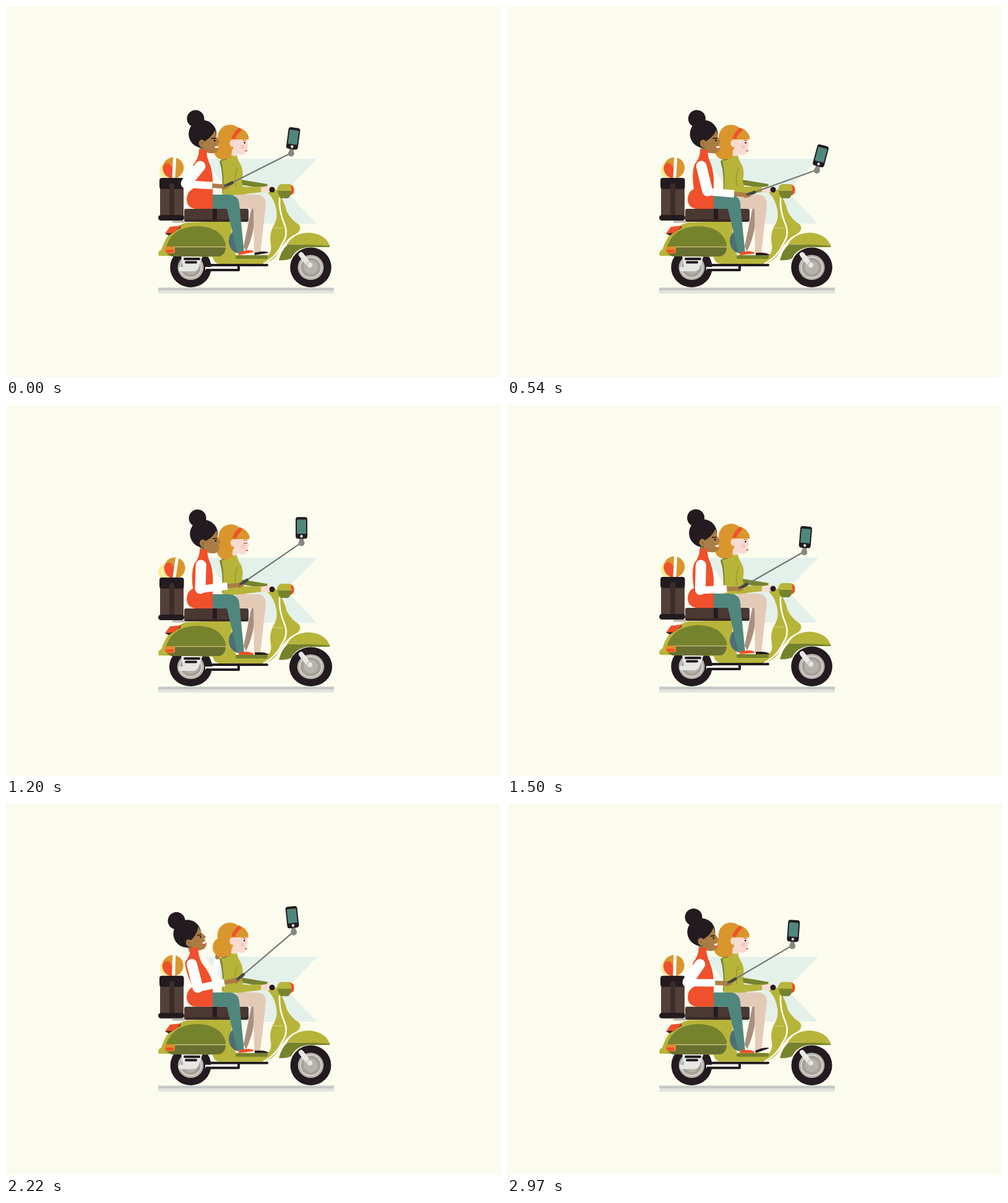
Write an HTML page with a canvas that moves like this. It is 800 by 600 pixels and loops after 3 s.

```html
<!DOCTYPE html>
<html lang="en">
<head>
<meta charset="utf-8">
<title>Scooter selfie</title>
<style>
html, body { margin: 0; width: 100%; height: 100%; overflow: hidden; background: #fcfcee; }
canvas { display: block; }
</style>
</head>
<body>
<canvas id="stage" width="800" height="600"></canvas>
<script>
const ctx = document.getElementById('stage').getContext('2d');
const LOOP = 3000, BOB = 750, STICK = 121;
const C = {
  bg: '#fcfcee', sky: '#e4f0ea', olive: '#b7b43a', green: '#76832d', moss: '#687031',
  dark: '#231b1f', brown: '#54403a', red: '#f0502b', teal: '#50877d', hair: '#d9962d',
  pale: '#f7dbd0', skin: '#ab7d46', beige: '#e3cab7', shade: '#a98f7e',
  steel: '#747774', silver: '#e6e7e5', rim: '#b7b3aa', white: '#fff'
};

// time, hand x, hand y, stick angle, elbow x, elbow y, lean
const POSES = [
  [0, 353, 292, -26.8, 291, 287, 0],
  [270, 381, 309, -18.3, 318, 302, 0],
  [840, 394, 302, -21.2, 331, 296, 1],
  [1200, 378, 291, -34.6, 314, 297, -1],
  [1770, 373, 302, -25.5, 311, 300, -1],
  [2220, 373, 285, -40.5, 310, 297, -24],
  [2730, 352, 271, -58, 290, 282, -11],
  [2970, 357, 290, -30.5, 292, 288, -3],
  [3000, 353, 292, -26.8, 291, 287, 0]
];

const rad = a => a * Math.PI / 180;
const mix = (a, b, k) => a + (b - a) * k;
const pulse = (t, mid, half) => {
  const d = Math.abs(t - mid) / half;
  return d < 1 ? Math.cos(d * Math.PI / 2) : 0;
};

function poseAt(t) {
  const i = POSES.findIndex(p => p[0] > t), a = POSES[i - 1], b = POSES[i];
  const k = (t - a[0]) / (b[0] - a[0]), s = k * k * (3 - 2 * k);
  return a.slice(1).map((v, n) => mix(v, b[n + 1], s));
}

function fill(color, d) {
  ctx.fillStyle = color;
  ctx.fill(new Path2D(d));
}
function line(color, width, d, cap = 'round') {
  ctx.strokeStyle = color;
  ctx.lineWidth = width;
  ctx.lineCap = cap;
  ctx.lineJoin = 'round';
  ctx.stroke(new Path2D(d));
}
function oval(color, x, y, rx, ry = rx) {
  ctx.fillStyle = color;
  ctx.beginPath();
  ctx.ellipse(x, y, rx, ry, 0, 0, 7);
  ctx.fill();
}
function box(color, x, y, w, h, r = 0) {
  ctx.fillStyle = color;
  ctx.beginPath();
  ctx.roundRect(x, y, w, h, r);
  ctx.fill();
}
function at(x, y, angle, draw) {
  ctx.save();
  ctx.translate(x, y);
  ctx.rotate(rad(angle));
  draw();
  ctx.restore();
}

function backdrop(t) {
  box(C.bg, 0, 0, 800, 600);
  const flash = (t >= 210 && t < 360) || (t >= 2790 && t < 2850);
  if (flash) box(C.sky, 336, 247, 218, 105, 52);
  else fill(C.sky, 'M322 247H503L452 299L502 352H322L358 299Z');
  box('#c6c8c6', 246, 455.5, 284, 4.5);
  box('#e2e4df', 246, 460, 284, 5);
  oval(C.white, 577.5, 462.5, 1.5);
}

function wheel(x, b) {
  const cy = 422.5 + b / 2, ry = 32.5 - b / 2, rx = 32.6 + 1.3 * b;
  oval(C.dark, x, cy, rx, ry);
  oval(C.rim, x, cy, rx * 0.63, ry * 0.63);
  oval(C.silver, x, cy, rx * 0.53, ry * 0.53);
  oval('#a5a19a', x, cy, rx * 0.49, ry * 0.49);
  oval(C.rim, x, cy, rx * 0.34, ry * 0.34);
}

function luggage(b) {
  oval('#f6ee9a', 262 - 2 * b, 264.5 + 3 * b, 13);
  at(269 + 2.3 * b, 261.3 + 0.7 * b, 5.5 * b, () => {
    oval(C.hair, 0, 0, 17);
    fill(C.red, 'M-17 0Q-14-8-8-7Q-1-4 0 7L-1 17A17 17 0 0 1-17 0Z');
    fill(C.white, 'M-1-17H4L4 16.500H-1Z');
  });
  box(C.brown, 249, 284, 38, 57, 2);
  box(C.dark, 248, 278, 39.5, 18, 4);
  box('#3d2d2a', 264, 287, 8, 52, 3);
  box(C.dark, 246, 338, 42, 9, 4.5);
  box('#b9b6ad', 269, 347, 20, 3.5);
}

function scooterBack() {
  fill(C.silver, 'M283 404H318L311 424Q308 429 302 429H281Q277 426 280 422H286Z');
  line(C.dark, 4, 'M289 409H312M291 414.500H307');
  box(C.white, 322, 422, 55, 5);
  line(C.dark, 4, 'M322 419H422');
  line(C.dark, 4, 'M323 427H376V420', 'butt');
}

function scooterBody() {
  fill(C.olive, 'M247 404Q244 397 251 394Q262 359 292 350L366 348Q361 374 372 403L345 406Z');
  fill(C.olive, 'M423 302L436 297Q449 312 454 333Q461 346 474 354Q479 364 466 370Q452 377 441 397Q435 411 417 417H345Q335 416 333 402L372 403H424Q430 395 428 386Q425 371 431 358Q440 345 437 330Q434 312 423 302Z');
  fill('#4c6e76', 'M374 361Q360 366 360 381Q361 395 374 400Z');
  line(C.bg, 2.6, 'M442 311Q441 332 450 353Q457 370 446 385Q437 406 417 416');
  line('#dbd892', 1, 'M430 359H447');
  box(C.green, 371, 403, 52, 6, 3);
  fill(C.green, 'M258 392Q267 357 310 356Q346 357 355 384Q356 400 345 405H268Q258 402 258 394Z');
  fill(C.moss, 'M259 390H355Q355 402 345 405H268Q259 402 259 390Z');
  line('#c8c682', 1.2, 'M271 389.500H355');
  box('#e38b2c', 257, 389, 16, 11, 3);
  box(C.red, 258, 394, 13, 5, 2);
  fill(C.dark, 'M257 368L263 371L283 358L279 356Z');
  fill(C.red, 'M257 368L265 357L284 355L271 367Z');
  // front fender and fork
  fill(C.green, 'M441 411Q445 395 455 386H523V390H487Q468 393 461 408Q452 412 441 411Z');
  fill(C.olive, 'M454 386Q464 367 490 366.500Q517 369 523 388Q490 385 454 386Z');
  line(C.silver, 8, 'M477 402L490 419');
  oval('#b9b7b1', 491, 419, 5.5);
  oval(C.silver, 491, 419, 4);
}

function seat() {
  box('#4c3832', 288, 328, 104, 21, 3);
  box(C.dark, 334, 328, 7, 21);
  box('#382925', 289, 345, 102, 4, 2);
}

function handlebar() {
  box(C.red, 452, 289, 13.500, 17, 7);
  fill(C.olive, 'M423 301Q434 299 438 297Q439 289 445 288H459Q462 294 461 300H440L436 306Z');
  fill(C.green, 'M439 299H461Q461 307 456 311H445Q440 307 439 299Z');
}

function blondeLegs(t) {
  fill(C.shade, 'M397 326L384 389L388 397Q402 368 403 330Z');
  fill(C.beige, 'M372 305H405Q420 306 420 320L411 400H401L400 328H372Z');
  const lift = -10 * pulse(t, 0, 130) - 20 * pulse(t, 2970, 180);
  at(402, 402, lift, () => fill(C.dark, 'M0 1V-3H10Q17-3 22 0Q23 1 22 1Z'));
}

function blonde(t, b) {
  const o = b - 0.5;
  at(0, o, 0, () => {
    line(C.green, 8, 'M380 285L422 292', 'butt');
    fill(C.green, 'M345 251Q352 245 361 244L369 270L352 303H349Q352 273 345 251Z');
    fill(C.olive, 'M362 238H373Q373 247 379 256Q385 266 381 283L386 305H350Q354 274 348 250Q361 250 362 238Z');
    line('#90922f', 1.2, 'M374 262Q368 278 372 291');
    line(C.olive, 12, 'M362 263Q365 281 361 298');
    fill(C.olive, 'M357 291Q383 293 413 292V301Q389 304 368 306Q353 307 357 291Z');
  });
  at(1.3 * o, o, 0, () => {
    oval(C.hair, 350 + 3.7 * o, 232 + 0.8 * o, 15, 16);
    fill(C.pale, 'M363 228H373V242Q367 244 362 240Z');
    oval(C.hair, 362, 212, 20);
    fill(C.hair, 'M342 212H369L363 247Q346 249 342 232Z');
    fill(C.pale, 'M368 213H389L389.500 220L392 226L389.500 228Q391 240 381 241Q370 240 367 230Z');
    fill(C.hair, 'M366 196Q386 195 392 211V216H369Z');
    oval(C.pale, 366, 222, 4.5, 6);
    line(C.red, 6, 'M367 215Q371 204 379 199', 'butt');
    oval('#f4c6ba', 382, 228, 3);
    if (t > 1130 && t < 1270) line('#8e5443', 1.2, 'M383 222Q386 224 388 222');
    else oval(C.dark, 385.5, 221, 1.2, 1.6);
    line('#bd7540', 1.3, 'M383 217L388 217.500');
    line('#d94d43', 1.5, 'M387 234.500L389.500 234');
  });
}

function farArm(t, n, b) {
  const wave = pulse(t, 840, 230), touch = pulse(t, 2220, 300), k = wave + touch;
  if (!k) return;
  const [ex, ey, hx, hy] = wave ? [350, 264, 382, 247] : [333, 292, 342, 253];
  const x = mix(318, hx, k), y = mix(292, hy, k) + b - 1;
  line(C.white, 10, `M${n} 260L${mix(318, ex, k)} ${mix(285, ey, k)}L${x} ${y}`);
  if (wave) at(x, y, 0, () => fill(C.skin, 'M2-3L12-9L21-8Q25-6 21-4L18-3L16 2L5 5Z'));
  else oval(C.skin, x, y - 5, 4);
}

function riderLegs(t) {
  fill(C.teal, 'M333 305H360Q376 306 377 320L385 400H374L357 328H333Z');
  const lift = -9 * pulse(t, 0, 300) - 12 * pulse(t, 270, 400) - 9 * pulse(t, 1950, 700);
  at(376, 402, Math.max(-12, lift), () => fill(C.red, 'M0 1Q0-4 4-4H15Q21-3 24-1V1Z'));
}

function riderTorso(n) {
  const x = (v, k = 1) => v + (n - 318) * k;
  fill(C.red, `M${x(312)} 232H${x(324)}Q${x(324)} 245 ${x(330)} 257Q${x(335, .4)} 273 334 290V328H306Q292 326 292 312Q293 300 302 296Q${x(298, .6)} 272 ${x(303)} 256Q${x(312)} 246 ${x(312)} 232Z`);
}

function riderHead(x, y, angle, smiling) {
  at(x, y, angle, () => {
    fill(C.skin, 'M-8 18H4V31Q-2 34-8 31Z');
    oval(C.dark, -8, -26, 14);
    oval(C.dark, 0, 0, 22.5);
    fill(C.skin, 'M-5 14Q13 10 21-4L22 8L26 16L22.500 18.500L23 25Q21 34 12 33Q0 32-5 22Z');
    oval(C.skin, -3, 15, 5, 6);
    line('#7d552d', 1, 'M-4 13Q-1 15-3 18');
    oval('#3f7a4a', -3, 22.5, 1.8);
    line(C.dark, 1.6, 'M14 9L20 9.500');
    oval(C.dark, 18, 13, 1.4, 1.6);
    if (!smiling) return;
    fill(C.white, 'M16 23L23 22L22 26Q18 27 16 23Z');
    line(C.red, 1.4, 'M16 24Q19 28 22.500 26');
  });
}

function selfieArm(n, hx, hy, angle, ex, ey) {
  const k = 43 / 63, wx = mix(ex, hx, k), wy = mix(ey, hy, k);
  const jx = hx + STICK * Math.cos(rad(angle)), jy = hy + STICK * Math.sin(rad(angle));
  line(C.steel, 2.2, `M${hx} ${hy}L${jx} ${jy}`);
  line(C.skin, 7, `M${wx} ${wy}L${hx} ${hy}`);
  line(C.white, 17, `M${n - 4} 259L${ex} ${ey}`);
  line(C.white, 12, `M${ex} ${ey + 1}L${wx} ${wy}`, 'butt');
  at(hx, hy, angle, () => {
    line('#454646', 5, 'M2 0H14');
    line(C.skin, 3.5, 'M-3 2L4 3');
  });
  at(jx, jy, angle + 34.5, () => {
    oval('#858783', 0, 1, 5);
    box('#858783', -3.5, -8, 7, 9);
    box(C.dark, -9.5, -41, 19, 35, 4);
    box('#50877d', -7.5, -37, 15, 23, 1);
    oval(C.silver, 0, -10, 2.2);
  });
}

function draw(now) {
  const t = now % LOOP;
  const b = 1.5 + 1.5 * Math.cos((t - 270) / BOB * 2 * Math.PI);
  const [hx, hy, angle, ex, ey, lean] = poseAt(t);
  const n = 317 + 1.7 * b + lean * 0.55;
  const bobbing = (part, ...args) => at(0, b - 0.5, 0, () => part(...args));

  backdrop(t);
  wheel(298.5, b);
  wheel(492.5, b);
  bobbing(luggage, b);
  bobbing(scooterBack);
  bobbing(scooterBody);
  bobbing(seat);
  farArm(t, n, b);
  bobbing(blondeLegs, t);
  blonde(t, b);
  bobbing(handlebar);
  bobbing(fill, C.pale, 'M412 293L424 291Q432 292 431 298Q425 303 412 301Z');
  bobbing(oval, C.dark, 430, 297, 4.5);
  bobbing(riderLegs, t);
  riderHead(316 + 3 * b + lean, 206.5 + b - lean / 8, -9 + 3 * b + lean * 0.6, b < 1.5);
  bobbing(riderTorso, n);
  selfieArm(n, hx, hy, angle, ex, ey);
  requestAnimationFrame(() => draw(performance.now()));
}
draw(0);
</script>
</body>
</html>
```
